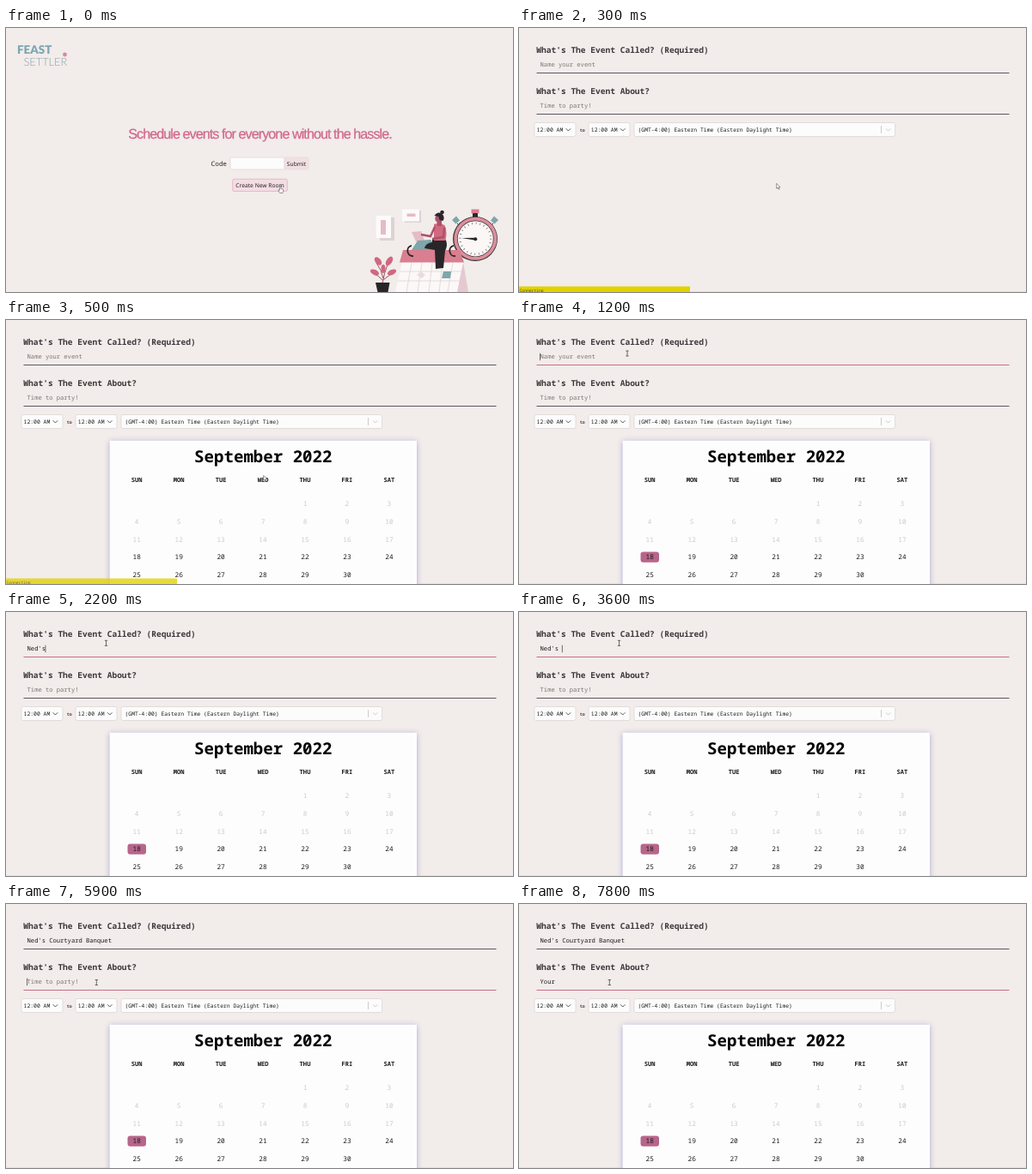
An HTML page that plays this animation: 590 by 308 pixels, repeating every 8000 ms.

```html
<!DOCTYPE html>
<html lang="en">
<head>
<meta charset="utf-8">
<title>Event scheduler</title>
<style>
  html, body { margin: 0; width: 100%; height: 100%; overflow: hidden; background: #f2ecea; }
  svg { display: block; width: 590px; height: 308px; }
  text { text-rendering: geometricPrecision; white-space: pre; }
  #home text { font-family: "Noto Sans", "Open Sans", sans-serif; font-size: 6.7px; fill: #2b2528; }
  #home .title { font: 16.2px "Liberation Sans", Arial, sans-serif; letter-spacing: -.96px; fill: #d0678a; stroke: #d0678a; stroke-width: .25; }
  #home .name { font: 900 13.4px Lato, sans-serif; fill: #7ba7b2; }
  #home .sub { font: 300 12.8px Lato, sans-serif; fill: #86a4b0; }
  #home .code { font-size: 7.6px; font-weight: 500; }
  #form text { font-family: "Noto Sans Mono", "DejaVu Sans Mono", monospace; font-size: 7.13px; fill: #1c1a1c; }
  #form .label { font-size: 9.55px; font-weight: 700; fill: #3d383c; }
  #form .hint { fill: #7b7577; }
  #form .time { font-size: 6.4px; font-weight: 500; }
  #form .zone { font-size: 6.37px; }
  #form .to { font-size: 5px; font-weight: 600; fill: #4b3d44; }
  #form .month { font-size: 19.1px; font-weight: 700; fill: #000; }
  #form .day { font-weight: 700; }
  #form .date { font-size: 7.8px; font-weight: 500; }
  #form .past { fill: #cbc9c9; font-weight: 400; }
  #form .status { font-size: 4.7px; fill: #4f4a10; }
  .mid { text-anchor: middle; }
  .box { fill: #fdfcfc; stroke: #dcd7d7; stroke-width: .8; }
  .chev { fill: none; stroke: #444; stroke-width: .9; }
  .pale { stroke: #cbc6c6; }
  .rule { stroke-width: 1.1; }
  #sheet { filter: drop-shadow(0 1px 3px #aaa9d6); }
  #cursors path { fill: #fff; stroke: #555; stroke-width: .6; stroke-linejoin: round; }
  #cursors #beam { fill: none; stroke: #333; stroke-width: .7; }
</style>
</head>
<body>
<svg viewBox="0 0 590 308">
  <g id="home">
    <text class="name" x="13" y="30">FEAST</text>
    <text class="sub" x="20.5" y="44">SETTLER</text>
    <circle cx="68.500" cy="31" r="2.400" fill="#d98a9d"/>
    <text class="title mid" x="295.5" y="129">Schedule events for everyone without the hassle.</text>
    <text class="code" x="238.5" y="161">Code</text>
    <rect class="box" x="261" y="151" width="63" height="14" rx="1.5"/>
    <rect x="324" y="151" width="28" height="14" rx="1.5" fill="#f1dfe2" stroke="#e9d8db" stroke-width=".7"/>
    <text class="mid" x="338" y="160.6">Submit</text>
    <rect x="263.7" y="176.3" width="63.6" height="14.2" rx="1.5" fill="#f3dde3" stroke="#e5b7c5" stroke-width=".9"/>
    <text class="mid" x="295.6" y="186">Create New Room</text>

    <g id="art">
      <path d="M448 221h4v27h-17v-3h13zM481 213h2v14h-19v-2h17z" fill="#ddd3d3"/>
      <path d="M430.500 219h17.500v26h-17.500zM461 211.500h20v14h-20z" fill="#fcfafa"/>
      <path d="M436 224h6v17h-6zM466.500 216.500h10v3.500h-10z" fill="#e3bcc5"/>

      <path d="M541.500 211.500h9v5h-9z" fill="#d97f90"/>
      <path d="M519 224l5-4.500 4 5-4.500 4zM573 224l-5-4.500-4 5 4.500 4z" fill="#7fa6aa"/>
      <path d="M543.500 216.500h5v4h-5zM525 228l3 3M567 228l-3 3" fill="#29262a" stroke="#29262a"/>
      <circle cx="546" cy="246" r="26" fill="#3a3336"/>
      <circle cx="546.300" cy="245.800" r="25" fill="#dc8f9d"/>
      <circle cx="546.300" cy="245.800" r="21.300" fill="#3a3336"/>
      <circle cx="546.300" cy="245.800" r="20.600" fill="#fbf7f6"/>
      <circle cx="546.300" cy="245.800" r="18" fill="none" stroke="#6f676a" stroke-width="2.400" stroke-dasharray=".7 4.012"/>
      <path d="M530 245l17-.3v3z" fill="#29262a"/>
      <circle cx="546.300" cy="246.300" r="2" fill="#29262a"/>

      <path d="M532 273l6 35h-15z" fill="#e5c9d0"/>
      <path d="M461 273h71l-7 35h-72z" fill="#fbf8f7"/>
      <path d="M462 259h66l5 14.500h-75z" fill="#d97f90"/>
      <path d="M459 284h71M456 295h72M472 274l-6 34M484 274l-5 34M496 274l-4 34M508 274l-4 34M520 274l-6 34" stroke="#ded3d4" stroke-width=".8" fill="none"/>
      <path d="M509 284h9l-1 8h-10z" fill="#7fa6aa"/>
      <path d="M483 284l5 4-4 4-6-4z" fill="#e9dcdd"/>
      <path d="M474 266c-8 1-9-11-2-12M523 266c-8 1-9-11-2-12" stroke="#29262a" stroke-width="1.800" fill="none"/>

      <path d="M477 249l-5-11 11-1 4 11z" fill="#e5bcc4"/>
      <path d="M472 259l7-11 15-1 5 5-1 7z" fill="#7fa6aa"/>
      <path d="M496 246h15q4 6 0 14l-2 20-9 1-1-22-12-2q1-6 9-7z" fill="#29262a"/>
      <path d="M498 229q8-3 13 2 3 9 0 17h-13z" fill="#d0687f"/>
      <path d="M499 232l-5 11-11-2M510 233l-1 11-13 2" fill="none" stroke="#a9546b" stroke-width="2.500"/>
      <path d="M501 224h6v7h-5z" fill="#a9546b"/>
      <circle cx="503" cy="222.500" r="3.700" fill="#a9546b"/>
      <path d="M498.500 219q3-5 8-3 5 4 2 9l-4-1-1-4z" fill="#29262a"/>
      <circle cx="507.500" cy="215" r="2.300" fill="#29262a"/>

      <path d="M438 298q2-12 6-22M439 292q-2-10-8-18M438 294q-5-6-10-7M439 294l9-7" stroke="#8f4358" stroke-width=".9" fill="none"/>
      <g fill="#d0687f">
        <ellipse cx="433" cy="272" rx="3.300" ry="5.500" transform="rotate(-38 433 272)"/>
        <ellipse cx="446" cy="272" rx="3.300" ry="6" transform="rotate(32 446 272)"/>
        <ellipse cx="429" cy="285" rx="3" ry="5.500" transform="rotate(-65 429 285)"/>
        <ellipse cx="449" cy="285" rx="3" ry="5.500" transform="rotate(65 449 285)"/>
        <ellipse cx="439" cy="281" rx="2.500" ry="5"/>
      </g>
      <path d="M430 297h16.500l-2 11h-12z" fill="#29262a"/>
    </g>
  </g>

  <g id="form">
    <path d="M0 307.600h590" stroke="#e2dcdc" stroke-width=".8"/>
    <text class="label" x="20.3" y="29.4">What's The Event Called? (Required)</text>
    <text class="label" x="20.3" y="77.4">What's The Event About?</text>
    <text id="text0" x="24.6" y="45.4"></text>
    <text id="text1" x="24.6" y="93.4"></text>
    <path id="rule0" class="rule" d="M20.500 52.500h550"/>
    <path id="rule1" class="rule" d="M20.500 100.500h550"/>
    <rect id="caret" width=".7" height="8.500" fill="#333"/>

    <rect class="box" x="18" y="110.500" width="48" height="16" rx="2"/>
    <rect class="box" x="81" y="110.500" width="48" height="16" rx="2"/>
    <rect class="box" x="134" y="110.500" width="303.500" height="16" rx="2"/>
    <text class="time" x="20.600" y="120.900">12:00 AM</text>
    <text class="to" x="70.800" y="120.500">to</text>
    <text class="time" x="83.800" y="120.900">12:00 AM</text>
    <text class="zone" x="138.500" y="120.900">(GMT-4:00) Eastern Time (Eastern Daylight Time)</text>
    <path class="chev" d="M54.700 117.300l2.700 2.700 2.700-2.700M118 117.300l2.700 2.700 2.700-2.700"/>
    <path class="chev pale" d="M421.500 114v9M427 117.300l2.700 2.700 2.700-2.700"/>

    <g id="calendar">
      <rect id="sheet" x="120.700" y="140.800" width="357.300" height="180" fill="#fefdfd"/>
      <text class="month mid" x="299.300" y="165.600">September 2022</text>
      <rect id="today" x="141.500" y="270.500" width="21.500" height="12.300" rx="3" fill="#b7658b"/>
    </g>
    <g id="bar">
      <rect y="301.500" width="199" height="6.500" fill="#e2d200"/>
      <text class="status" x=".5" y="307.800">Connecting</text>
    </g>
  </g>

  <g id="cursors">
    <path id="hand" d="M-.6 0q1-.8 1.400 0v3l2.700.7q.5 2-.6 4.300h-3.200l-2-3.200.8-.5.900.8z"/>
    <path id="arrow" d="M0 0v6l1.400-1.200 1 2.200 1-.5-1-2h1.900z"/>
    <path id="beam" d="M-1.700-3h3.400M0-3v6M-1.700 3h3.400"/>
  </g>
</svg>
<script>
const $ = id => document.getElementById(id);
const show = (id, on) => { $(id).style.display = on ? '' : 'none'; };
const clamp = v => Math.max(0, Math.min(1, v));

const LOOP = 8000, CHAR = 4.28;
const fields = [
  { value: "Ned's Courtyard Banquet", hint: 'Name your event', length: nameLength },
  { value: 'Your ', hint: 'Time to party!', length: aboutLength }
];

// Calendar grid
function addText(cls, x, y, str) {
  const el = document.createElementNS('http://www.w3.org/2000/svg', 'text');
  el.setAttribute('class', 'mid ' + cls);
  el.setAttribute('x', x);
  el.setAttribute('y', y);
  el.textContent = str;
  $('calendar').append(el);
}
const colX = c => 152.2 + 48.95 * c;
'SUN MON TUE WED THU FRI SAT'.split(' ').forEach((d, c) => addText('day', colX(c), 189, d));
for (let d = 1; d <= 30; d++) {
  const cell = d + 3;
  addText(d < 18 ? 'date past' : 'date', colX(cell % 7), 217 + 20.8 * Math.floor(cell / 7), d);
}

// Typed characters, by tenth of a second
function nameLength(k) {
  if (k < 18) return 0;
  if (k < 25) return Math.min(6, k - 17);
  if (k < 35) return Math.min(8, k - 18);
  if (k < 37) return 42 - k;
  return Math.min(23, k - 30 + (k > 41));
}
function aboutLength(k) {
  if (k < 65) return 0;
  return k < 68 ? k - 64 : 5;
}

const blinks = [[16, 18], [30, 33], [62, 65], [71, 75], [78, 80]];

// Pointer: tenth, x, y
const path = [[0, 319, 184.5], [1, 319, 184.5], [3, 299.7, 181.3], [7, 299.7, 181.3],
  [9, 205, 106], [11, 135, 45], [12, 126, 39], [13, 126, 39], [16, 116.5, 36.3],
  [53, 116.5, 36.3], [57, 105.3, 91.5], [80, 105.3, 91.5]];
function pointer(k) {
  const i = path.findIndex(p => p[0] > k);
  const [a, x, y] = path[i - 1], [b, x2, y2] = path[i];
  const f = (k - a) / (b - a);
  return [x + (x2 - x) * f, y + (y2 - y) * f];
}

function draw(t) {
  const k = Math.floor(t / 100);
  show('home', k < 2);
  show('form', k >= 2);
  show('calendar', k >= 5);
  show('today', k >= 6);
  $('bar').style.opacity = clamp((6.5 - k) / 1.9);

  const focus = k < 12 ? -1 : k < 58 ? 0 : 1;
  fields.forEach((f, i) => {
    const n = f.length(k), el = $('text' + i);
    el.textContent = n ? f.value.slice(0, n) : f.hint;
    el.setAttribute('class', n ? '' : 'hint');
    $('rule' + i).style.stroke = i === focus ? '#cb6d88' : '#5d5766';
  });

  show('caret', focus >= 0 && !blinks.some(([a, b]) => k >= a && k < b));
  if (focus >= 0) {
    $('caret').setAttribute('x', 24.2 + CHAR * fields[focus].length(k));
    $('caret').setAttribute('y', focus ? 86.7 : 38.7);
  }

  const kind = k < 2 ? 'hand' : k < 10 ? 'arrow' : 'beam';
  ['hand', 'arrow', 'beam'].forEach(id => show(id, id === kind));
  $('cursors').setAttribute('transform', `translate(${pointer(k)})`);
}

const start = performance.now();
function tick() {
  draw((performance.now() - start) % LOOP);
  requestAnimationFrame(tick);
}
tick();
</script>
</body>
</html>
```
